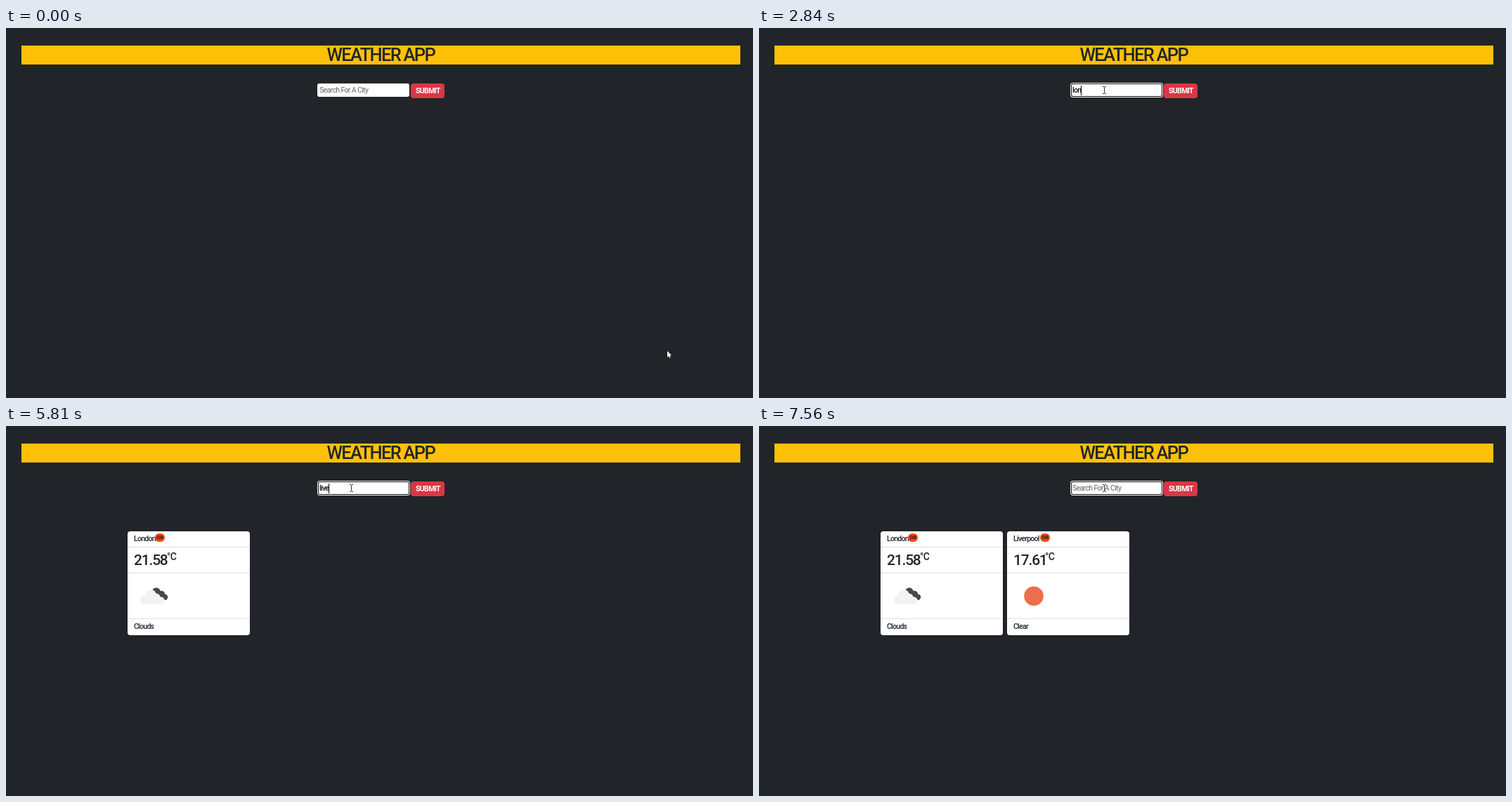
Animation of 1063x527 px, one loop 8000 ms. Source, as an HTML page with a canvas:

```html
<!DOCTYPE html>
<html lang="en">
<head>
<meta charset="utf-8">
<title>Weather App</title>
<style>
  html, body { margin: 0; width: 100%; height: 100%; overflow: hidden; background: #212529; }
  body { position: relative; font: 500 10.5px/20px Roboto, "Liberation Sans", sans-serif; letter-spacing: -.07em; color: #212529; }
  div, span.t, canvas { position: absolute; }
  .t { white-space: pre; margin-top: -10px; }
  #banner { left: 22px; top: 25px; width: 1023px; height: 27px; background: #ffc107; }
  #title { left: 456.5px; top: 38px; font-size: 25.5px; letter-spacing: -1.7px; }
  #field { left: 443px; top: 79px; width: 131px; height: 19px; background: #fff; border-radius: 3px; }
  #field.focus { left: 445px; top: 80px; width: 128px; height: 17px; border-radius: 2px; box-shadow: 0 0 0 1px #101010, 0 0 0 2px #fff; }
  #hint { left: 446px; top: 88.5px; font-weight: 400; letter-spacing: -.06em; color: #666; }
  #entry { left: 446px; top: 88.5px; color: #111; }
  #caret { display: inline-block; width: 1px; height: 14px; background: #000; vertical-align: middle; }
  #submit { left: 576px; top: 79px; width: 48px; height: 21px; border-radius: 4px; background: #dc3545; }
  #submit .t { left: 7px; top: 10.5px; font-weight: 700; letter-spacing: -.06em; color: #fff; }
  .card { top: 149.5px; width: 174px; height: 148.5px; border-radius: 4px; background: #fff; }
  .card .line { left: 0; width: 100%; height: 1px; background: #dfdfdf; }
  .card .t { left: 9px; }
  .card .name { top: 11px; }
  .card .temp { top: 41px; font-size: 21px; letter-spacing: -1.2px; }
  .card .unit { top: 36.5px; font-size: 14px; letter-spacing: -.7px; }
  .card .sky { top: 136.5px; }
  .card .badge { top: 3px; width: 14px; height: 12px; border-radius: 6px; background: #fb4510; font: 700 7.5px/12px Roboto, sans-serif; letter-spacing: -.3px; text-align: center; }
  canvas { left: 0; top: 0; }
</style>
</head>
<body>
<div id="banner"></div>
<span class="t" id="title">WEATHER APP</span>
<div id="field"></div>
<span class="t" id="hint">Search For A City</span>
<span class="t" id="entry"><span id="typed"></span><span id="caret"></span></span>
<div id="submit"><span class="t">SUBMIT</span></div>
<canvas id="stage" width="1063" height="527"></canvas>
<script>
const LOOP = 8000;
const FOCUS = 1240;
const ARROW_FROM = [941, 460];
const BEAM_AT = [491, 88];

// Each search: text, the time of every key press, the submit time.
const searches = [
  { text: 'london', keys: [2370, 2580, 2840, 3110, 3240, 3440], done: 4100 },
  { text: 'liverpool', keys: [5150, 5410, 5610, 5810, 6030, 6380, 6710, 6840, 7040], done: 7560 }
];
const caretOff = [[1770, 2230], [3970, 4490], [5020, 5150], [7500, LOOP]];

const $ = id => document.getElementById(id);
const canvas = $('stage');
const ctx = canvas.getContext('2d');

function addCard(x, city, badgeX, temp, unitX, sky) {
  const card = document.createElement('div');
  card.className = 'card';
  card.style.left = x + 'px';
  card.innerHTML = `<span class="t name">${city}</span><div class="badge" style="left:${badgeX}px">GB</div>
    <span class="t temp">${temp}</span><span class="t unit" style="left:${unitX}px">°C</span>
    <span class="t sky">${sky}</span>` +
    [22.5, 59, 124.5].map(y => `<div class="line" style="top:${y}px"></div>`).join('');
  document.body.insertBefore(card, canvas);
  return card;
}

const cards = [
  addCard(173, 'London', 39, '21.58', 56, 'Clouds'),
  addCard(353, 'Liverpool', 47, '17.61', 54, 'Clear')
];

function disc(x, y, r, color) {
  ctx.fillStyle = color;
  ctx.beginPath();
  ctx.arc(x, y, r, 0, Math.PI * 2);
  ctx.fill();
}

function lightCloud(grow, color) {
  const puffs = [[197.3, 247.8, 6.2], [205.5, 241.3, 7.6], [213.5, 244.5, 5.2], [220, 249, 5]];
  for (const [x, y, r] of puffs) disc(x, y, r + grow, color);
  ctx.fillRect(197, 246 - grow, 23, 8 + grow * 2);
}

function drawClouds() {
  for (const [x, y, r] of [[213.8, 236.3, 6], [221.2, 239.5, 4.8], [226, 243.7, 4.2], [218, 243, 4]]) {
    disc(x, y, r, '#484848');
  }
  lightCloud(.8, '#fff');
  lightCloud(0, '#f2f2f2');
}

function drawArrow(x, y) {
  const outline = [[0, 0], [0, 9], [2, 7.2], [3.4, 10], [4.8, 9.3], [3.6, 6.5], [6.2, 6.3]];
  ctx.beginPath();
  for (const [dx, dy] of outline) ctx.lineTo(x + dx, y + dy);
  ctx.closePath();
  ctx.lineWidth = 1;
  ctx.strokeStyle = '#111';
  ctx.stroke();
  ctx.fillStyle = '#fff';
  ctx.fill();
}

function drawBeam(x, y) {
  ctx.fillStyle = '#333';
  ctx.fillRect(x, y - 4, 1, 9);
  for (const dy of [-5, 5]) {
    ctx.fillRect(x - 2, y + dy, 2, 1);
    ctx.fillRect(x + 1, y + dy, 2, 1);
  }
}

function drawPointer(t) {
  const step = t < 70 ? 0 : Math.min(13, Math.floor((t - 70) / 64.2) + 1);
  const p = step / 13;
  const eased = p * p * (3 - 2 * p);
  const [x, y] = ARROW_FROM.map((from, i) => Math.round(from + (BEAM_AT[i] - from) * eased));
  if (y < 98) drawBeam(x, y);
  else drawArrow(x, y);
}

function render(t) {
  const typed = searches
    .filter(s => t < s.done)
    .map(s => s.text.slice(0, s.keys.filter(k => t >= k).length))[0] || '';
  const blinkedOff = caretOff.some(([from, to]) => t >= from && t < to);

  $('field').className = t >= FOCUS ? 'focus' : '';
  $('hint').style.visibility = typed ? 'hidden' : 'visible';
  $('typed').textContent = typed;
  $('caret').style.visibility = t >= FOCUS && !blinkedOff ? 'visible' : 'hidden';
  cards.forEach((card, i) => { card.style.display = t >= searches[i].done ? 'block' : 'none'; });

  ctx.clearRect(0, 0, canvas.width, canvas.height);
  if (t >= searches[0].done) drawClouds();
  if (t >= searches[1].done) disc(391, 242.3, 13.8, '#ec6e4c');
  drawPointer(t);
}

const start = performance.now();
function tick() {
  render((performance.now() - start) % LOOP);
  requestAnimationFrame(tick);
}
tick();
</script>
</body>
</html>
```
